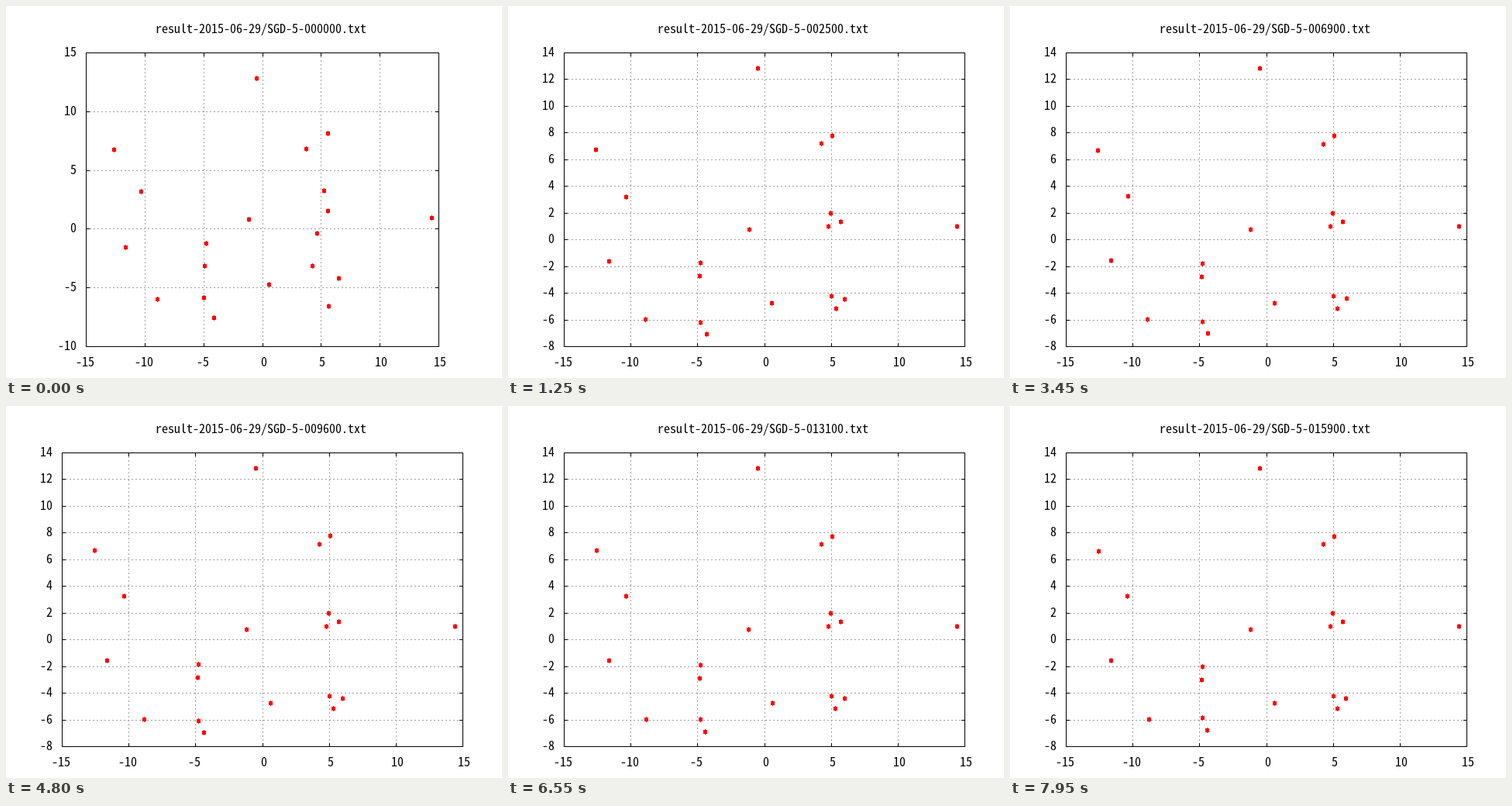
Recreate the animation shown at these times as an HTML page with a canvas. Size 640 by 480 pixels, loop 8000 ms.

```html
<!DOCTYPE html>
<html lang="en">
<head>
<meta charset="utf-8">
<title>Scatter plot</title>
<style>
html, body { margin: 0; width: 100%; height: 100%; overflow: hidden; background: #fff; }
canvas { display: block; }
</style>
</head>
<body>
<canvas id="stage" width="640" height="480"></canvas>
<script>
const ctx = document.getElementById('stage').getContext('2d');
const FRAMES = 160, FRAME_MS = 50;
const SUBSTEPS = 200, RATE = 0.0575;
const TOP = 60, BOTTOM = 439;

const WIDE = { left: 103, right: 558, min: -10, max: 15, tick: 5 };
const TIGHT = { left: 72, right: 589, min: -8, max: 14, tick: 2 };

const START = [
  [-0.49, 12.83], [5.57, 8.14], [3.73, 6.82], [-12.615, 6.73], [-10.34, 3.215],
  [5.24, 3.26], [5.57, 1.54], [14.42, 0.98], [-1.15, 0.8], [4.65, -0.37],
  [-11.63, -1.588], [-4.78, -1.23], [-4.9, -3.14], [4.25, -3.14], [6.49, -4.2],
  [0.57, -4.735], [-8.94, -5.97], [-4.98, -5.82], [5.64, -6.57], [-4.12, -7.54]
];

// Gradient descent on a Lennard-Jones potential with its minimum at distance 1.
function descend(points) {
  const moves = points.map(() => [0, 0]);
  for (let i = 0; i < points.length; i++) {
    for (let j = 0; j < i; j++) {
      const dx = points[j][0] - points[i][0];
      const dy = points[j][1] - points[i][1];
      const inv2 = 1 / (dx * dx + dy * dy);
      const inv6 = inv2 * inv2 * inv2;
      const pull = RATE * inv6 * inv2 * (1 - inv6);
      moves[i][0] += pull * dx;
      moves[i][1] += pull * dy;
      moves[j][0] -= pull * dx;
      moves[j][1] -= pull * dy;
    }
  }
  return points.map(([x, y], i) => [x + moves[i][0], y + moves[i][1]]);
}

function simulate() {
  const history = [START];
  let points = START;
  while (history.length < FRAMES) {
    for (let s = 0; s < SUBSTEPS; s++) points = descend(points);
    history.push(points);
  }
  return history;
}

function line(x1, y1, x2, y2) {
  ctx.beginPath();
  ctx.moveTo(x1, y1);
  ctx.lineTo(x2, y2);
  ctx.stroke();
}

function text(label, x, y, align) {
  ctx.textAlign = align;
  ctx.fillText(label, x, y);
}

function range(from, to, step) {
  const values = [];
  for (let v = from; v <= to; v += step) values.push(v);
  return values;
}

function drawAxes(view, toX, toY) {
  const { left, right } = view;
  const xs = range(-15, 15, 5);
  const ys = range(view.min, view.max, view.tick);

  ctx.strokeStyle = '#a0a0a0';
  ctx.setLineDash([2, 3]);
  for (const v of xs) line(toX(v) + 0.5, TOP, toX(v) + 0.5, BOTTOM + 1);
  for (const v of ys) line(left, toY(v) + 0.5, right + 1, toY(v) + 0.5);

  ctx.setLineDash([]);
  ctx.strokeStyle = ctx.fillStyle = '#000';
  for (const v of xs) {
    const x = toX(v);
    line(x + 0.5, TOP, x + 0.5, TOP + 5);
    line(x + 0.5, BOTTOM - 4, x + 0.5, BOTTOM + 1);
    text(v, x + (v < 0 ? -1 : 2), 465, 'center');
  }
  for (const v of ys) {
    const y = toY(v);
    line(left, y + 0.5, left + 5, y + 0.5);
    line(right - 4, y + 0.5, right + 1, y + 0.5);
    text(v, left - 12, y + 5, 'right');
  }
  ctx.strokeRect(left + 0.5, TOP + 0.5, right - left, BOTTOM - TOP);
}

function draw(frame, points) {
  // The axis picks coarser ticks while the data spans more than 20 units.
  const heights = points.map(p => p[1]);
  const view = Math.max(...heights) - Math.min(...heights) > 20 ? WIDE : TIGHT;
  const toX = v => Math.round(view.left + (v + 15) / 30 * (view.right - view.left));
  const toY = v => Math.round(BOTTOM - (v - view.min) / (view.max - view.min) * (BOTTOM - TOP));

  ctx.fillStyle = '#fff';
  ctx.fillRect(0, 0, 640, 480);
  ctx.lineWidth = 1;
  ctx.font = '16px "Noto Sans Mono CJK JP", "Noto Sans Mono CJK SC", "Noto Sans Mono", monospace';
  drawAxes(view, toX, toY);
  text(`result-2015-06-29/SGD-5-${String(frame * 100).padStart(6, '0')}.txt`, 329, 35, 'center');

  ctx.fillStyle = '#f00';
  for (const [px, py] of points) {
    const x = toX(px), y = toY(py);
    ctx.fillRect(x - 2, y - 2, 5, 5);
    ctx.fillRect(x, y - 3, 1, 7);
  }
}

const history = simulate();
const start = performance.now();
function tick() {
  const frame = Math.floor((performance.now() - start) / FRAME_MS) % FRAMES;
  draw(frame, history[frame]);
  requestAnimationFrame(tick);
}
tick();
</script>
</body>
</html>
```
